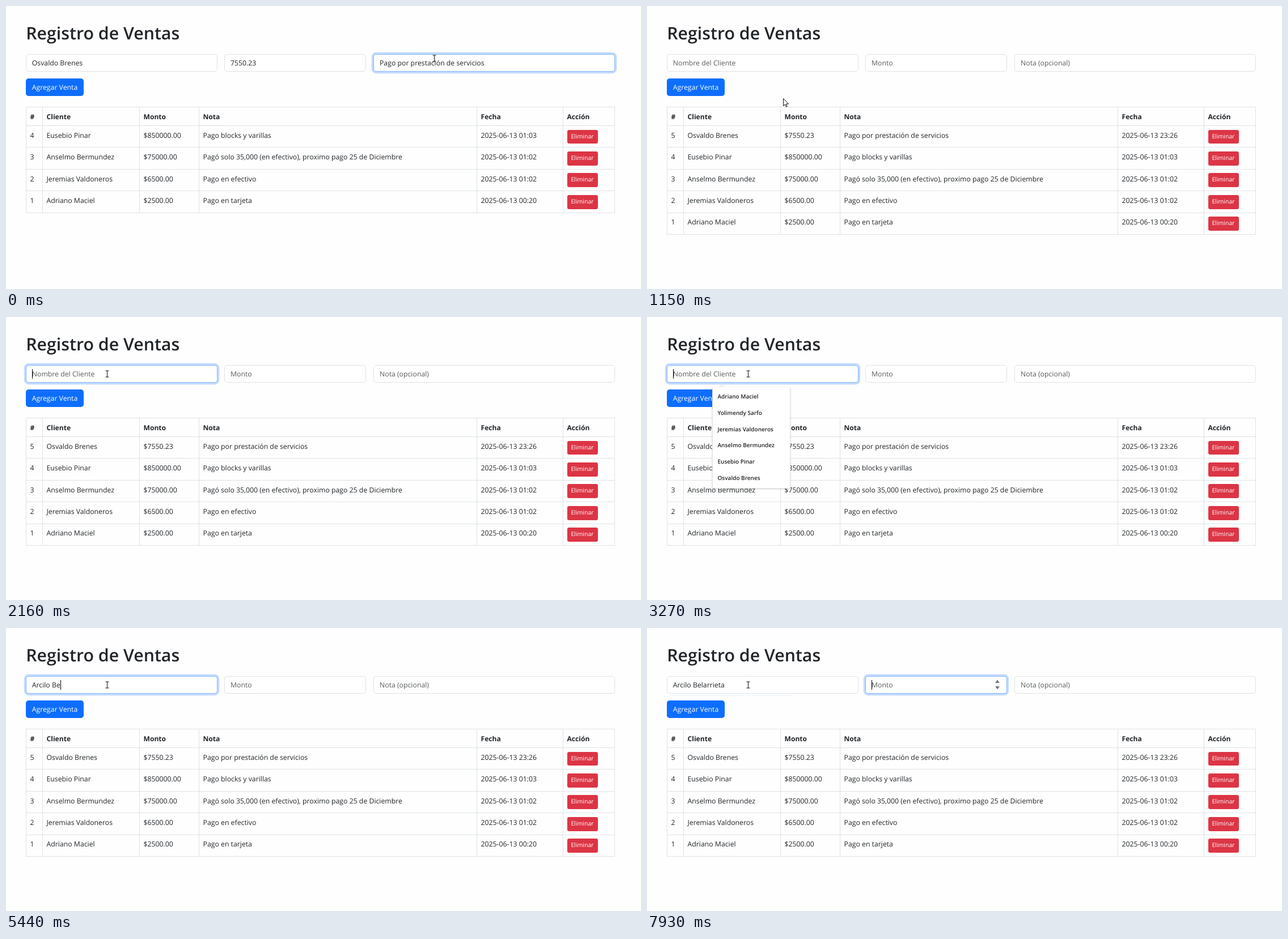
An HTML page for the animation above (8 s loop, 1120 px wide and 500 px high).

```html
<!DOCTYPE html>
<html lang="es">
<head>
<meta charset="utf-8">
<title>Registro de Ventas</title>
<style>
  html, body { margin: 0; width: 100%; height: 100%; overflow: hidden; background: #fefefe; }
  body {
    position: relative; color: #212529; white-space: pre;
    font: 12.28px/19.2px "Open Sans", "Noto Sans", sans-serif;
    text-rendering: geometricPrecision;
  }
  h1, .field, .add, .table, .menu, #pointer { position: absolute; margin: 0; box-sizing: border-box; }
  h1 { left: 35.2px; top: 28.8px; font-size: 30.3px; line-height: 38.4px; font-weight: 600; }

  .field {
    top: 84.8px; height: 30.8px; padding: 0 9.6px; display: flex; align-items: center;
    border: 1px solid #dee2e6; border-radius: 4.8px; background: #fff;
  }
  .field.focus { border-color: #86b7fe; box-shadow: 0 0 0 3.2px rgba(13, 110, 253, .25); }
  .field.empty { color: #585c5f; }
  .field i { width: 1px; height: 17px; margin: 1px -1px 0 0; background: #000; visibility: hidden; }
  .field.caret i { visibility: visible; }
  .field.empty i { order: -1; }
  #spin { position: absolute; right: 11px; top: 4px; width: 10px; height: 20px; fill: #777; }

  .add, .del { color: #fff; text-align: center; }
  .add { left: 35.2px; top: 128.4px; width: 101.6px; height: 30.8px; line-height: 31px; border-radius: 4.8px; }
  .del { width: 54px; height: 24.8px; margin-top: -.2px; border-radius: 3.2px; background: #dc3545; font-size: 10.5px; line-height: 25px; }

  .table { left: 35px; top: 178px; width: 1039px; border: solid #dee2e6; border-width: 1px 0 0 1px; }
  .row { display: grid; grid-template-columns: 29px 171px 105px 490px 152px 91px; height: 38.4px; }
  .row > div { box-sizing: border-box; padding: 6.8px 6.5px 0; border: solid #dee2e6; border-width: 0 1px 1px 0; }
  .head { height: 33px; font-weight: 700; font-size: 12.1px; }

  .menu {
    left: 115px; top: 124px; width: 138px; padding: 2px 8.5px 3px; background: #fff;
    border: solid #e4e4e4; border-width: 0 1px 1px; border-radius: 2px; box-shadow: 0 1px 3px rgba(0, 0, 0, .18);
    font-size: 10px; line-height: 28.8px; font-weight: 600; color: #222;
  }
  .menu::before {
    content: ""; position: absolute; left: 10px; top: -6px;
    border: 6px solid transparent; border-top: 0; border-bottom-color: #f0f0f0;
  }
  #pointer { left: 0; top: 0; width: 1120px; height: 500px; }
</style>
</head>
<body>
<h1>Registro de Ventas</h1>
<div class="field" id="client" style="left:35.2px;width:337.8px"><span></span><i></i></div>
<div class="field" id="amount" style="left:385.4px;width:250px"><span></span><i></i><svg id="spin"><path d="M1 7 5 1.5 9 7zM1 13 5 18.5 9 13z"/></svg></div>
<div class="field" id="note" style="left:648.4px;width:425.2px"><span></span><i></i></div>
<div class="add" id="add">Agregar Venta</div>
<div class="table" id="table"></div>
<div class="menu" id="menu"></div>
<svg id="pointer"><path id="shape" stroke-linejoin="round"/></svg>
<script>
const $ = id => document.getElementById(id);
const LOOP = 8000, SAVED = 1150;
const newSale = ["Osvaldo Brenes", "7550.23", "Pago por prestación de servicios"];
const newClient = "Arcilo Belarrieta";

const sales = [
  [...newSale, "2025-06-13 23:26"],
  ["Eusebio Pinar", "850000.00", "Pago blocks y varillas", "2025-06-13 01:03"],
  ["Anselmo Bermundez", "75000.00", "Pagó solo 35,000 (en efectivo), proximo pago 25 de Diciembre", "2025-06-13 01:02"],
  ["Jeremias Valdoneros", "6500.00", "Pago en efectivo", "2025-06-13 01:02"],
  ["Adriano Maciel", "2500.00", "Pago en tarjeta", "2025-06-13 00:20"],
];
const clients = ["Adriano Maciel", "Yolimendy Sarfo", "Jeremias Valdoneros",
  "Anselmo Bermundez", "Eusebio Pinar", "Osvaldo Brenes"];

const row = (cells, type = "") =>
  `<div class="row ${type}">${cells.map(c => `<div>${c}</div>`).join("")}</div>`;
$("table").innerHTML = row(["#", "Cliente", "Monto", "Nota", "Fecha", "Acción"], "head") +
  sales.map(([name, sum, note, date], i) =>
    row([sales.length - i, name, "$" + sum, note, date, '<div class="del">Eliminar</div>'])).join("");
const newRow = $("table").children[1];
$("menu").innerHTML = clients.map(name => `<div>${name}</div>`).join("");

const shapes = {
  beam: "M-3-5.5H3M0-5.5V5.5M-3 5.5H3",
  arrow: "M0 0V13l3-2.8 2 4.6 1.9-.8-2-4.5h4.2z",
  hand: "M-1.5-8c1.4 0 1.6 1 1.6 2v4l5 1.2c1 .3 1.4 1 1.3 2l-.8 5.5q-.3 1.8-2 1.8h-3.6" +
    "q-1 0-1.7-.8l-4.2-4.8c-.7-1 .6-2 1.6-1.3l1.3 1v-8.6c0-1 .3-2 1.5-2z",
};

// Tracks hold [start, ...value] steps.
const moves = [
  [0, "beam", 755.5, 92.5], [160, "arrow", 690.5, 79.5], [300, "beam", 520.5, 93.5],
  [430, "beam", 330.5, 106.5], [570, "arrow", 190.5, 133.5], [710, "hand", 115, 150],
  [1150, "arrow", 240.5, 163.5], [1280, "arrow", 326.5, 150.5], [1430, "arrow", 316.5, 146.5],
  [1580, "arrow", 270.5, 128.5], [1720, "beam", 215.5, 108.5], [1870, "beam", 186.5, 101.5],
  [2010, "beam", 178.5, 100.5],
];
const addColors = [[0, "#0d6efd"], [710, "#0b5ed7"], [1020, "#0a58ca"], [SAVED, "#0d6efd"]];
const focuses = [[0, "note"], [1020, ""], [2160, "client"], [6940, "amount"]];
const carets = [[0, 0], [300, 1], [2740, 0], [3270, 1], [7360, 0], [7930, 1]];
const menuFades = [[0, 0], [2310, .5], [2460, 1], [4250, .82], [4400, 0]];
const keyTimes = [3680, 4130, 4550, 4700, 4850, 5000, 5140, 5290, 5440,
  5690, 5830, 5970, 6120, 6120, 6260, 6380, 6500];

const at = (track, t) => track.filter(step => step[0] <= t).pop().slice(1);

function setField(id, value, hint, focus, caret) {
  const field = $(id), focused = focus === id;
  field.firstChild.textContent = value || hint;
  field.classList.toggle("empty", !value);
  field.classList.toggle("focus", focused);
  field.classList.toggle("caret", focused && !!caret);
}

function draw(t) {
  const saved = t >= SAVED;
  const [focus] = at(focuses, t), [caret] = at(carets, t);
  const typed = newClient.slice(0, keyTimes.filter(k => k <= t).length);
  const [name, sum, note] = saved ? [typed, "", ""] : newSale;
  setField("client", name, "Nombre del Cliente", focus, caret);
  setField("amount", sum, "Monto", focus, caret);
  setField("note", note, "Nota (opcional)", focus, caret);
  $("spin").style.display = focus === "amount" ? "" : "none";
  newRow.style.display = saved ? "" : "none";
  $("add").style.background = at(addColors, t)[0];

  $("menu").style.opacity = at(menuFades, t)[0];
  for (const item of $("menu").children)
    item.style.display = item.textContent.startsWith(typed.slice(0, 1)) ? "" : "none";

  const [kind, x, y] = at(moves, t);
  const shape = $("shape");
  shape.setAttribute("d", shapes[kind]);
  shape.setAttribute("transform", `translate(${x} ${y})`);
  shape.setAttribute("fill", kind === "beam" ? "none" : "#fff");
  shape.setAttribute("stroke", "#111");
}

const start = performance.now();
function tick() {
  draw((performance.now() - start) % LOOP);
  requestAnimationFrame(tick);
}
tick();
</script>
</body>
</html>
```
